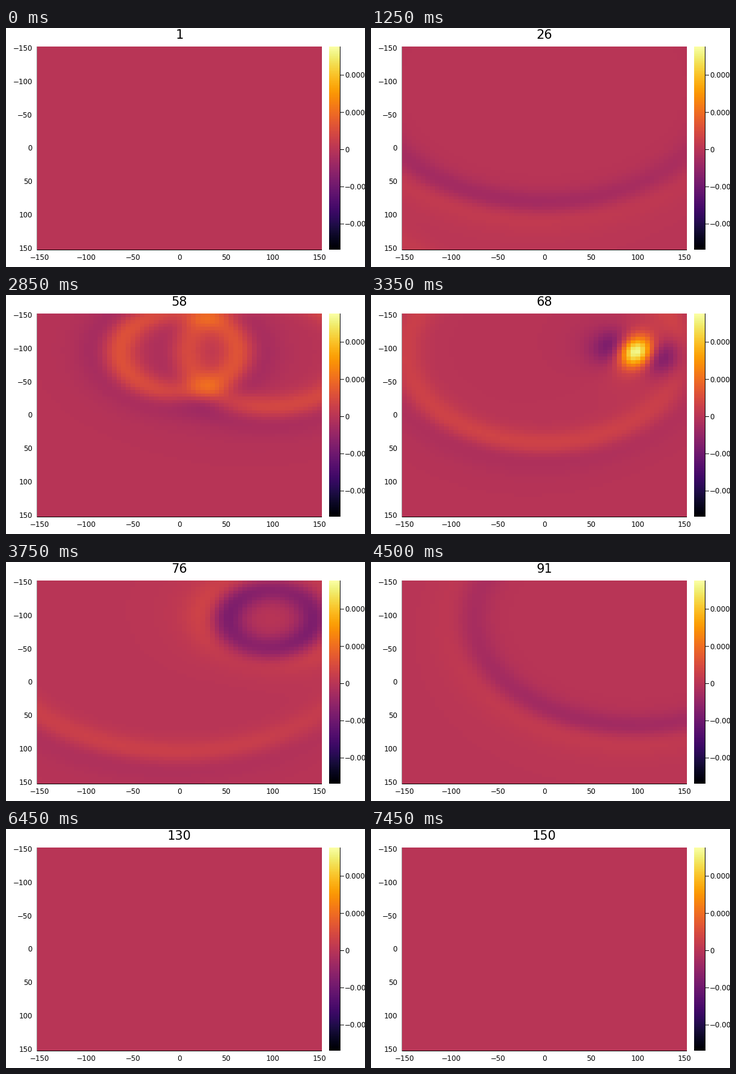
Animation of 600 by 400 pixels, one loop 7500 ms. Source, as a matplotlib script:

```python
import numpy as np
import matplotlib.pyplot as plt
from matplotlib.animation import FuncAnimation
from matplotlib.lines import Line2D

W, H, DPI = 600, 400, 100
FRAMES, INTERVAL = 150, 50
LEFT, RIGHT, TOP, BOTTOM = 52, 528, 31, 371
VMIN, VMAX = -2.69, 2.77
SIGMA = 14.0
# focus x, focus y, focus time, signed amplitude
WAVES = [(-1, -95, 49.5, -2.77), (98, -95, 69.5, 2.77)]

plt.rcParams["font.family"] = "DejaVu Sans"
fig = plt.figure(figsize=(W / DPI, H / DPI), dpi=DPI, facecolor="white")


def panel(x0, x1, data):
    ax = fig.add_axes([x0 / W, 1 - BOTTOM / H, (x1 - x0) / W, (BOTTOM - TOP) / H])
    ax.axis("off")
    return ax.imshow(data, cmap="inferno", vmin=VMIN, vmax=VMAX,
                     aspect="auto", interpolation="nearest")


def label(x, y, s, ha="center", size=8.64):
    return fig.text(x / W, 1 - y / H, s, ha=ha, va="baseline", fontsize=size)


def line(x0, y0, x1, y1, lw=0.72):
    fig.add_artist(Line2D([x0 / W, x1 / W], [1 - y0 / H, 1 - y1 / H],
                          color="black", lw=lw, snap=False,
                          solid_capstyle="butt"))


# Each wave is a fan of plane pulses that all meet at its focus.
grid = np.arange(-150, 151, 5, dtype=np.float32)
gx, gy = (a.ravel() for a in np.meshgrid(grid, grid))
theta = np.linspace(0, 2 * np.pi, 240, endpoint=False, dtype=np.float32)
cos, sin = np.cos(theta)[:, None], np.sin(theta)[:, None]
speed = 8.4 - 0.6 * sin ** 2
paths = [cos * (gx - x) + sin * (gy - y) for x, y, _, _ in WAVES]


def pulse(s):
    s = s / SIGMA
    return s * np.exp(0.5 - s * s / 2)


def field(n):
    u = np.zeros(gx.size)
    for path, (_, _, t0, amp) in zip(paths, WAVES):
        t = n - t0
        if abs(t) > 60:
            continue
        # sideways pulses dominate at the focus, vertical ones far from it
        squeeze = 0.8 * np.exp(-(t / 6) ** 2) - 0.4 * min(1, (t / 25) ** 2)
        weight = 1 + squeeze * np.cos(2 * (theta - 0.3))
        fade = np.exp(-abs(t) / 50)
        u += amp * fade * (weight @ pulse(path - speed * np.float32(t))) / theta.size
    return u.reshape(grid.size, grid.size)


heat = panel(LEFT, RIGHT, field(1))
panel(540, 558, np.linspace(VMAX, VMIN, 256)[:, None])

line(LEFT, BOTTOM + 0.5, RIGHT, BOTTOM + 0.5)
line(LEFT - 0.5, TOP, LEFT - 0.5, BOTTOM + 1, 0.25)
line(558.5, TOP, 558.5, BOTTOM)

for v in range(-150, 151, 50):
    s = str(v).replace("-", "\u2212")
    part = (v + 152.5) / 305
    label(LEFT + part * (RIGHT - LEFT), 387.6, s)
    label(44, TOP + part * (BOTTOM - TOP) + 4.4, s, "right")

for k in range(-2, 3):
    y = TOP + (VMAX - k) / (VMAX - VMIN) * (BOTTOM - TOP)
    s = f"{k * 0.00025:.5f}".replace("-", "\u2212") if k else "0"
    line(559, y, 565, y)
    label(566, y + 4.4, s, "left")

title = label(290, 18.4, "1", size=15)


def update(i):
    heat.set_data(field(i + 1))
    title.set_text(str(i + 1))
    return heat, title


anim = FuncAnimation(fig, update, frames=FRAMES, interval=INTERVAL,
                     repeat=True, repeat_delay=0, blit=False)
plt.show()
```
